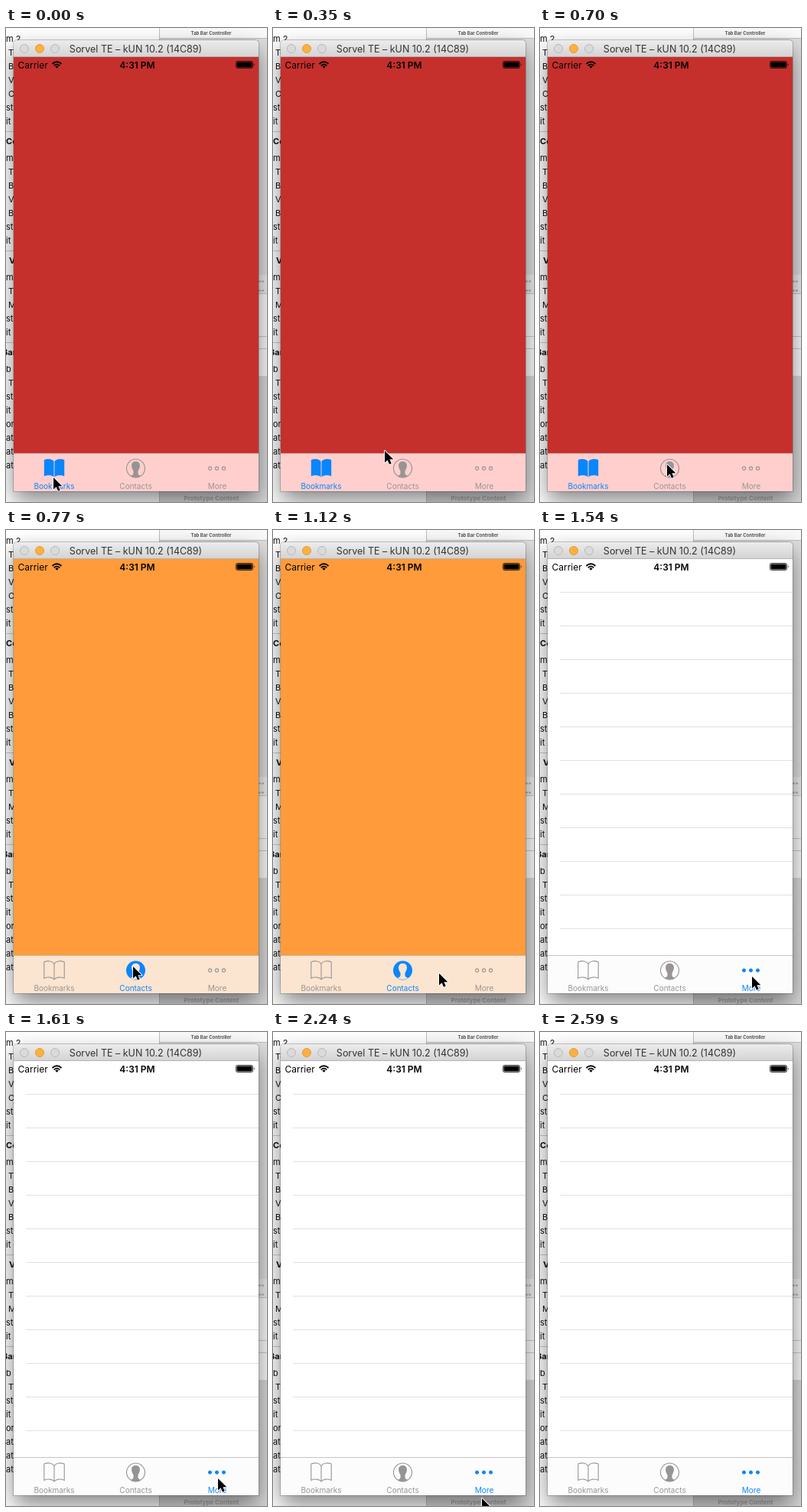
Animation of 341 by 620 pixels, one loop 2.94 s. Source, as an HTML page:

```html
<!DOCTYPE html>
<html lang="en">
<head>
<meta charset="utf-8">
<title>Tab bar demo</title>
<style>
  html, body { margin: 0; width: 100%; height: 100%; overflow: hidden; background: #fff; }
  svg { display: block; width: 341px; height: 620px; }
  text { font-family: Inter, Roboto, sans-serif; }
  .mid { text-anchor: middle; }
  .label { font-size: 10px; fill: currentColor; }
  .list { font-size: 11px; fill: #111; }
  .list .head { font-weight: 700; }
  .tint { color: #0a86fb; }
  .gray { color: #989494; }
  .line { fill: none; stroke: currentColor; stroke-width: 1.1; }
  .solid { fill: currentColor; }

  .scene, #cursor { animation: 2940ms step-end infinite; }
  #red { animation-name: first; }
  #orange { animation-name: second; }
  #table { animation-name: third; }
  #cursor { animation-name: point; }

  @keyframes first { 0% { opacity: 1 } 26.19%, 100% { opacity: 0 } }
  @keyframes second { 0% { opacity: 0 } 26.19% { opacity: 1 } 52.38%, 100% { opacity: 0 } }
  @keyframes third { 0% { opacity: 0 } 52.38%, 100% { opacity: 1 } }

  /* the pointer is sampled every 70 ms */
  @keyframes point {
    0%     { transform: translate(62px, 588px) }
    2.38%  { transform: translate(64px, 585px) }
    4.76%  { transform: translate(75px, 576px) }
    7.14%  { transform: translate(95px, 565px) }
    9.52%  { transform: translate(121px, 556px) }
    11.9%  { transform: translate(146px, 553px) }
    14.28% { transform: translate(163px, 557px) }
    16.66% { transform: translate(169px, 566px) }
    19.04% { transform: translate(166px, 571px) }
    33.33% { transform: translate(171px, 572px) }
    35.71% { transform: translate(189px, 575px) }
    38.09% { transform: translate(217px, 580px) }
    40.47% { transform: translate(249px, 584px) }
    42.85% { transform: translate(270px, 585px) }
    45.23% { transform: translate(277px, 584px) }
    76.19% { transform: translate(273px, 610px) }
    78.57%, 100% { transform: translate(272px, 640px) }
  }
</style>
</head>
<body>
<svg viewBox="0 0 341 620" xmlns="http://www.w3.org/2000/svg">
  <defs>
    <filter id="blur" x="-20%" y="-20%" width="140%" height="140%">
      <feGaussianBlur stdDeviation="15"/>
    </filter>
    <linearGradient id="chrome" x2="0" y2="1">
      <stop stop-color="#ececec"/>
      <stop offset="1" stop-color="#d3d3d3"/>
    </linearGradient>
    <pattern id="rows" x="26" y="81" width="304" height="44" patternUnits="userSpaceOnUse">
      <rect width="304" height="1" fill="#e1e1e3"/>
    </pattern>
    <clipPath id="disc"><circle cx="169.5" cy="576" r="12"/></clipPath>

    <path id="pages" d="M63 567.5C60.5 563.5 54.5 563 49.8 565V586.3C54.5 584.3 60.5 584.6 63 587.8C65.500 584.6 71.500 584.3 76.200 586.300V565C71.500 563 65.500 563.500 63 567.500Z"/>
    <path id="person" clip-path="url(#disc)" d="M169.500 567C173.300 567 175.200 569.300 174.900 573C174.700 575.800 173.500 577.600 172.500 579.500V582.500C172.500 584.800 175.500 585.300 177.500 586.500V589H161.500V586.500C163.500 585.300 166.500 584.800 166.500 582.500V579.500C165.500 577.600 164.300 575.800 164.100 573C163.800 569.300 165.700 567 169.500 567Z"/>
    <g id="dots">
      <circle cx="266.500" cy="576" r="2.100"/>
      <circle cx="275.500" cy="576" r="2.100"/>
      <circle cx="284.500" cy="576" r="2.100"/>
    </g>

    <g id="book-label"><text class="label mid" x="63" y="602.500">Bookmarks</text></g>
    <g id="book-off">
      <use href="#pages" class="line"/>
      <path class="line" d="M63 567.500V587.500"/>
      <use href="#book-label"/>
    </g>
    <g id="book-on">
      <use href="#pages" class="solid"/>
      <path d="M63 567V588" stroke="#ffcfcd" stroke-width="1"/>
      <use href="#book-label"/>
    </g>
    <g id="contact-label"><text class="label mid" x="169.500" y="602.500">Contacts</text></g>
    <g id="contact-off">
      <circle class="line" cx="169.500" cy="576" r="12"/>
      <use href="#person" class="solid"/>
      <use href="#contact-label"/>
    </g>
    <g id="contact-on">
      <circle class="solid" cx="169.500" cy="576" r="12.500"/>
      <use href="#person" fill="#fce5d0"/>
      <use href="#contact-label"/>
    </g>
    <g id="more-label"><text class="label mid" x="276" y="602.500">More</text></g>
    <g id="more-off"><use href="#dots" class="line"/><use href="#more-label"/></g>
    <g id="more-on">
      <use href="#dots" class="solid" stroke="currentColor"/>
      <use href="#more-label"/>
    </g>
    <rect id="bar-edge" x="10" y="556" width="320" height="1" fill="#000" opacity=".22"/>
  </defs>

  <!-- editor behind the window -->
  <rect width="341" height="620" fill="#fff"/>
  <rect x="200" width="141" height="620" fill="#dedede"/>
  <rect x="200" width="141" height="13" fill="#f9f9f9"/>
  <path d="M200 13.500H341M200.500 0V620" stroke="#bdbdbd"/>
  <rect x="201" y="323" width="140" height="24" fill="#ececec"/>
  <rect x="201" y="348" width="140" height="107" fill="#fafafa"/>
  <path d="M201 347.500H341M201 403.500H341M201 419.500H341" stroke="#c9c9c9"/>
  <path d="M330 331.500h7M330 343.500h7" stroke="#b0b0b0" stroke-width="2" stroke-dasharray="3 1"/>
  <rect x="201" y="455" width="140" height="165" fill="#d8d8d8"/>
  <text class="mid" x="268" y="8.500" font-size="6" font-weight="700" fill="#555">Tab Bar Controller</text>
  <text class="mid" x="268.500" y="618" font-size="8" font-weight="700" fill="#a3a3a3">Prototype Content</text>
  <g id="list" class="list"></g>
  <path d="M0 135.500H200M0 291.500H200M0 411.500H200" stroke="#ccc"/>

  <rect x="10" y="29" width="320" height="590" fill="#000" opacity=".47" filter="url(#blur)"/>

  <!-- window -->
  <path d="M9.500 606.500V21Q9.500 15.500 15 15.500H325Q330.500 15.500 330.500 21V606.500Z" fill="none" stroke="#000" stroke-opacity=".2"/>
  <path d="M10 38V21Q10 16 15 16H325Q330 16 330 21V38Z" fill="url(#chrome)"/>
  <rect x="10" y="37" width="320" height="1" fill="#b3b3b3"/>
  <g fill="#dadada" stroke="#b9b9b9">
    <circle cx="24" cy="27" r="5.500"/>
    <circle cx="44" cy="27" r="5.500" fill="#fdb040" stroke="#e09b37"/>
    <circle cx="64" cy="27" r="5.500"/>
  </g>
  <text class="mid" x="169.500" y="32" font-size="12.500" fill="#333">Sorvel TE – kUN 10.2 (14C89)</text>

  <g id="red" class="scene">
    <rect x="10" y="38" width="320" height="518" fill="#c5302d"/>
    <rect x="10" y="556" width="320" height="50" fill="#ffcfcd"/>
    <use href="#bar-edge"/>
    <use href="#book-on" class="tint"/>
    <use href="#contact-off" class="gray"/>
    <use href="#more-off" class="gray"/>
  </g>
  <g id="orange" class="scene">
    <rect x="10" y="38" width="320" height="518" fill="#ff9b3a"/>
    <rect x="10" y="556" width="320" height="50" fill="#fce5d0"/>
    <use href="#bar-edge"/>
    <use href="#book-off" class="gray"/>
    <use href="#contact-on" class="tint"/>
    <use href="#more-off" class="gray"/>
  </g>
  <g id="table" class="scene">
    <rect x="10" y="38" width="320" height="568" fill="#fff"/>
    <rect x="26" y="81" width="304" height="475" fill="url(#rows)"/>
    <rect x="10" y="556" width="320" height="50" fill="#fcfcfc"/>
    <use href="#bar-edge"/>
    <use href="#book-off" class="gray"/>
    <use href="#contact-off" class="gray"/>
    <use href="#more-on" class="tint"/>
  </g>

  <!-- status bar -->
  <text x="15.500" y="52.500" font-size="12">Carrier</text>
  <g fill="none" stroke="#000" stroke-width="1.700">
    <path d="M60.500 47Q66.500 41.500 72.500 47M62.700 49.300Q66.500 45.800 70.300 49.300"/>
    <path d="M64.300 50.500Q66.500 48.700 68.700 50.500L66.500 52.800Z" fill="#000" stroke="none"/>
  </g>
  <text class="mid" x="171.500" y="52.500" font-size="12" font-weight="600">4:31 PM</text>
  <rect x="300.500" y="43.500" width="22" height="9" rx="2" fill="none" stroke="#000" stroke-opacity=".75"/>
  <rect x="301.500" y="44.500" width="20" height="7" rx="1"/>
  <path d="M324 46.200Q325.600 48 324 49.800Z"/>

  <g id="cursor">
    <path d="M0 0V15.500L3.600 12.200L6 17.700L8.700 16.500L6.400 11.200H11.300Z" stroke="#fff" stroke-width="1.800" stroke-linejoin="round" paint-order="stroke"/>
  </g>
</svg>
<script>
  // each section: first baseline, then rows 18px apart; capitals are indented
  const sections = [
    { y: 18, rows: ["m 2", "Te", "B", "V", "C", "st", "it"] },
    { y: 174, head: "Co", x: 0, rows: ["m", "T", "B", "V", "B", "st", "it"] },
    { y: 330, head: "V", x: 4, rows: ["m", "T", "M", "st", "it"] },
    { y: 450, head: "Bar", x: -5, rows: ["b", "T", "st", "it", "ort", "at", "at", "at"] }
  ];
  const list = document.getElementById("list");

  function addText(str, x, y, cls) {
    const el = document.createElementNS("http://www.w3.org/2000/svg", "text");
    el.setAttribute("x", x);
    el.setAttribute("y", y);
    if (cls) el.setAttribute("class", cls);
    el.textContent = str;
    list.append(el);
  }

  for (const { y, head, x, rows } of sections) {
    if (head) addText(head, x, y - 22, "head");
    rows.forEach((str, i) => addText(str, /^[A-Z]/.test(str) ? 3 : 0, y + i * 18));
  }
</script>
</body>
</html>
```
